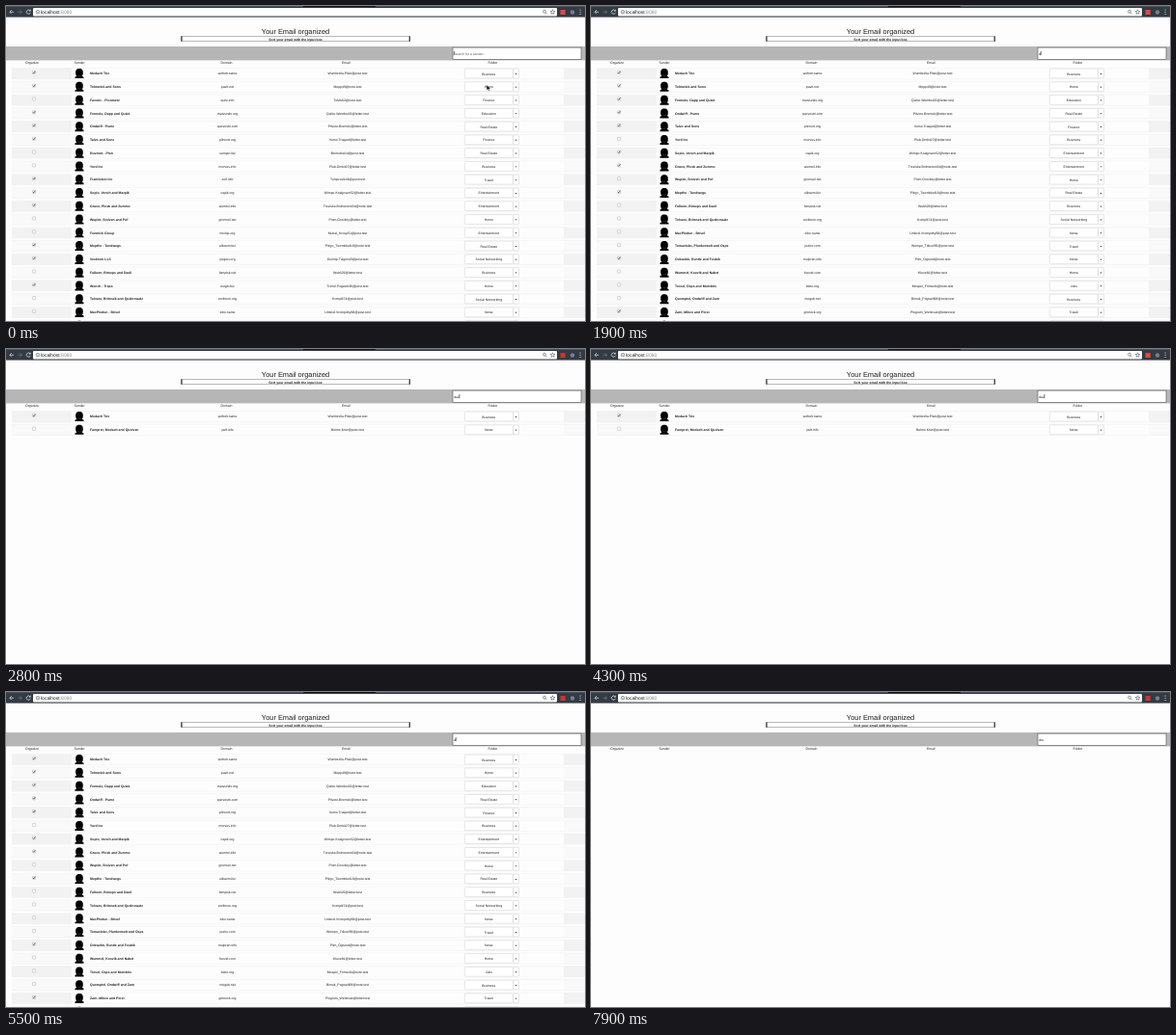
An HTML page for the animation above (8 s loop, 600 px wide and 327 px high).

```html
<!DOCTYPE html>
<html lang="en">
<head>
<meta charset="utf-8">
<title>Your Email organized</title>
<style>
  html, body { margin: 0; width: 100%; height: 100%; overflow: hidden; background: #fdfdfd; }
  svg { display: block; width: 600px; height: 327px; }
  text { font: 3.45px "Liberation Sans", Arial, sans-serif; fill: #1c1c1c; text-rendering: geometricPrecision; }
  .mid { text-anchor: middle; }
  .bold { font-weight: bold; }
  .line { fill: none; stroke: #d5d8dc; stroke-width: .8; }
</style>
</head>
<body>
<svg id="stage" viewBox="0 0 600 327">
  <defs>
    <g id="avatar">
      <rect x="71.5" y="-5" width="9" height="10" fill="#f6f6f6"/>
      <path d="M76-5C73-5 72-3 72.2-.5C72.2 1 72.6 2 73.3 2.6L71.5 3.6V5H80.5V3.6L78.7 2.6C79.4 2 79.8 1 79.8-.5C80-3 79-5 76-5Z"/>
      <path d="M74.3 1.5Q76 3.6 77.7 1.5" fill="none" stroke="#666" stroke-width=".4"/>
    </g>
    <g id="select" fill="#fff" stroke="#ccc" stroke-width=".5">
      <rect x="475.3" y="-5" width="50.2" height="9.8" rx=".8"/>
      <rect x="525.5" y="-5" width="6" height="9.8" rx=".8"/>
      <path d="M527.5-.1h2l-1 1.2z" fill="#222" stroke="none"/>
    </g>
  </defs>

  <rect width="600" height="11.6" fill="#323a44"/>
  <rect width="600" height="1" fill="#4a5560"/>
  <rect x="308" width="75" height="1" fill="#15191e"/>
  <rect x="28" y="2" width="543" height="8.4" rx="1" fill="#fff"/>
  <g class="line">
    <path d="M8 6.2H4M5.8 4.2L3.8 6.2L5.8 8.2"/>
    <path d="M12.3 6.2h4M14.5 4.2l2 2l-2 2" stroke="#6c747d"/>
    <path d="M25 4.9A2.1 2.1 0 1 0 25.3 6.8M25.3 3.7V5.2H23.8"/>
    <g stroke="#555" stroke-width=".6">
      <circle cx="33" cy="6.2" r="1.8"/><path d="M33 5.9v1.3M33 5v.4"/>
      <circle cx="558" cy="5.7" r="1.5"/><path d="M559.1 6.8l1.6 1.6"/>
      <path d="M566.5 3.8l.7 1.6l1.7.1l-1.3 1.1l.4 1.7l-1.5-.9l-1.5.9l.4-1.7l-1.3-1.1l1.7-.1z"/>
    </g>
  </g>
  <text x="36" y="8" style="font-size:5px">localhost<tspan fill="#888">:8080</tspan></text>
  <rect id="badge" x="574.5" y="4" width="5.2" height="5"/>
  <circle cx="587" cy="6.5" r="2.2" fill="#77808c"/>
  <path d="M594.6 3.6h1v1h-1zM594.6 5.8h1v1h-1zM594.6 8h1v1h-1z" fill="#d5d8dc"/>

  <text x="300" y="29.3" class="mid" style="font-size:7.43px">Your Email organized</text>
  <rect x="181.8" y="31.6" width="236.5" height="5" fill="#fff" stroke="#777" stroke-width=".5"/>
  <path d="M182 31.4v5.4M418.2 31.4v5.4" stroke="#111"/>
  <text x="300" y="35.6" class="mid bold">Sort your email with the input box</text>

  <rect y="42" width="600" height="14.4" fill="#b6b6b6"/>
  <rect x="463" y="43.1" width="133" height="12.3" fill="#fff" stroke="#555" stroke-width=".6"/>
  <text x="464.2" y="50.5" id="query"></text>
  <path id="caret" d="M0 47v4.2" stroke="#111" stroke-width=".6"/>

  <text x="20" y="60.4">Organize</text>
  <text x="70.6" y="60.4">Sender</text>
  <text x="222.5" y="60.4">Domain</text>
  <text x="348" y="60.4">Email</text>
  <text x="499.5" y="60.4">Folder</text>
  <g id="bands"></g>
  <g id="rows"></g>

  <path id="pointer" d="M-1-3V2.4L.3 1.2L1.2 3.2L2 2.8L1.1.9H2.8Z" stroke="#fff" stroke-width=".3"/>
  <path id="beam" d="M-1-2.6Q0-2.6 0-1.8V1.8Q0 2.6-1 2.6M1-2.6Q0-2.6 0-1.8M0 1.8Q0 2.6 1 2.6" fill="none" stroke="#222" stroke-width=".5"/>
</svg>
<script>
const LOOP = 8000, TOP = 70.1, PITCH = 13.77;

// sender | domain | mailbox | folder | + when ticked
const hosts = { p: 'post.test', n: 'note.test', l: 'letter.test' };
const senders = `Modach Trio|wofrelt.name|Wumbrella.Plisk@p|Business|+
Tolmwick and Sons|pavit.net|Mopp49@n|Home|+
Favoric - Plonmest|quilo.info|Tolvik62@n|Finance|
Fennulo, Dapp and Quisk|marvundo.org|Quibo.Wembst33@l|Education|+
Ondwiff - Pume|quovestri.com|Plivore.Bremok@l|Real Estate|+
Talvo and Sons|plinvort.org|Vumo.Traspel@l|Finance|+
Ruvmek - Plon|sumpto.biz|Bromvilet14@p|Real Estate|
Yord Inc|morvus.info|Plub.Omkit27@l|Business|
Framboket Inc|zulf.info|Tumprovik46@p|Travel|+
Soplo, Vench and Marpik|ospik.org|Wimpo.Kralgoven52@l|Entertainment|+
Gruvo, Plosk and Zummo|wumtol.info|Troviske.Bolmwrent34@n|Entertainment|+
Wuplet, Stoiven and Pof|gromvel.net|Plom.Grovikty@l|Home|
Fonmick Group|mivlop.org|Mubel_Krosp51@p|Entertainment|
Mopthe - Tundwegs|ulkwom.biz|Plirgo_Twombkel18@n|Real Estate|+
Veskrom LLC|pogruv.org|Ovrimp.Tulgon45@p|Social Networking|+
Fulkern, Bimops and Daxil|fompisk.net|Wubli29@l|Business|
Wonch - Treps|wuglo.biz|Trimol.Pogwelt36@p|Home|+
Tolvaro, Brimsek and Quelnowatz|ervilmon.org|Komplit74@p|Social Networking|
MacPlodun - Brivel|zibo.name|Umkrel.Vrompithy68@p|News|
Tomavisko, Plunkerwelt and Osps|purko.com|Wompo_Trikvel56@p|Travel|
Ockwelm, Runtle and Fosbik|mulpren.info|Plim_Ogrund@n|News|+
Wummel, Koovik and Nabet|funvel.com|Kluve81@l|Home|
Trovel, Osps and Mumbrix|bixto.org|Mospel_Frimvolk@n|Jobs|
Quomptel, Ondwiff and Zarn|mogub.net|Bimuk_Pogwelt98@n|Business|
Zarn, Mikvo and Plost|grintock.org|Plogrum_Wentivak@l|Travel|+
Daxtol, Brovinalko and Wulm|uvelp.com|Vupo62@n|Real Estate|
Fumpret, Modach and Quolven|puft.info|Bulmo.Krivt@p|News|
Grolke, Daxtol and Wembu|vumpo.name|Omplitu7@n|Home|+
Oudas, Mopwerk and Fulkern|skempod.name|Trumofel.Wisporck51@l|Groups|+
Mumbrix, Plonda and Trelwickston|zubi.info|Pomlurk48@p|Finance|+`
  .split('\n').map(line => line.split('|'));

const typed = [[0, ''], [1900, 'd'], [2300, 'da'], [2800, 'dac'], [3300, 'dach'],
  [4300, 'dac'], [4700, 'da'], [5500, 'd'], [6700, 'dr'], [7400, 'dre']];
const caretFlips = [200, 700, 1300, 1900, 3900, 4300, 4900, 5500, 5900, 6400, 7200, 7400, 7900];
const badgeFlips = [2500, 3500, 5500, 6500, 7500];

const el = id => document.getElementById(id);
const show = (node, on) => node.setAttribute('display', on ? 'inline' : 'none');
const place = (node, x, y) => node.setAttribute('transform', `translate(${x} ${y})`);
const flipped = (flips, t) => flips.filter(at => at <= t).length % 2 === 1;

el('bands').innerHTML = senders.map((_, i) => {
  const y = TOP + i * PITCH - 5.6, fill = i % 2 ? '#f9f9f9' : '#f2f2f2';
  return `<g><path d="M6 ${y}h62v11.2h-62zM578 ${y}h22v11.2h-22z" fill="${fill}"/>
    <path d="M6 ${y}h594m0 11.2h-594" stroke="#eee" stroke-width=".5"/></g>`;
}).join('');

el('rows').innerHTML = senders.map(([name, domain, mail, folder, tick]) => {
  const [user, host] = mail.split('@');
  return `<g>
    <rect x="27.4" y="-2.7" width="3.2" height="3.2" rx=".6" fill="#fff" stroke="#aaa" stroke-width=".5"/>
    ${tick && '<path d="M28-1.1l.8.9l1.5-2.1" fill="none" stroke="#222" stroke-width=".7"/>'}
    <use href="#avatar"/><use href="#select"/>
    <text x="87" y="1.2" class="bold">${name}</text>
    <text x="229.5" y="1.2" class="mid">${domain}</text>
    <text x="354" y="1.2" class="mid">${user}@${hosts[host]}</text>
    <text x="500.3" y="1.4" class="mid">${folder}</text></g>`;
}).join('');

const rows = [...el('rows').children], bands = [...el('bands').children];

function filterRows(query) {
  let count = 0;
  rows.forEach((row, i) => {
    const match = senders[i][0].toLowerCase().includes(query);
    show(row, match);
    if (match) place(row, 0, TOP + PITCH * count++);
  });
  bands.forEach((band, i) => show(band, i < count));
}

function drawMouse(t) {
  const p = Math.min(t / 700, 1), ease = p * p * (3 - 2 * p);
  const x = 499.2 - 10.2 * ease, y = 85 - 36 * ease, inField = y < 55;
  show(el('pointer'), !inField);
  show(el('beam'), inField && t < 1700);
  place(el('pointer'), x, y);
  place(el('beam'), x, y);
}

let shown = null;
function draw(now) {
  const t = Math.floor(now % LOOP / 100) * 100;
  const query = typed.findLast(([at]) => at <= t)[1], field = el('query');
  if (query !== shown) {
    filterRows(query);
    field.textContent = query || 'Search for a sender...';
    field.style.fill = query ? '#1c1c1c' : '#555';
    shown = query;
  }
  place(el('caret'), 464.3 + (query && field.getComputedTextLength()), 0);
  show(el('caret'), !flipped(caretFlips, t));
  el('badge').setAttribute('fill', flipped(badgeFlips, t) ? '#c9352f' : '#e2483f');
  drawMouse(t);
}

const start = performance.now();
function tick() {
  draw(performance.now() - start);
  requestAnimationFrame(tick);
}
tick();
</script>
</body>
</html>
```
